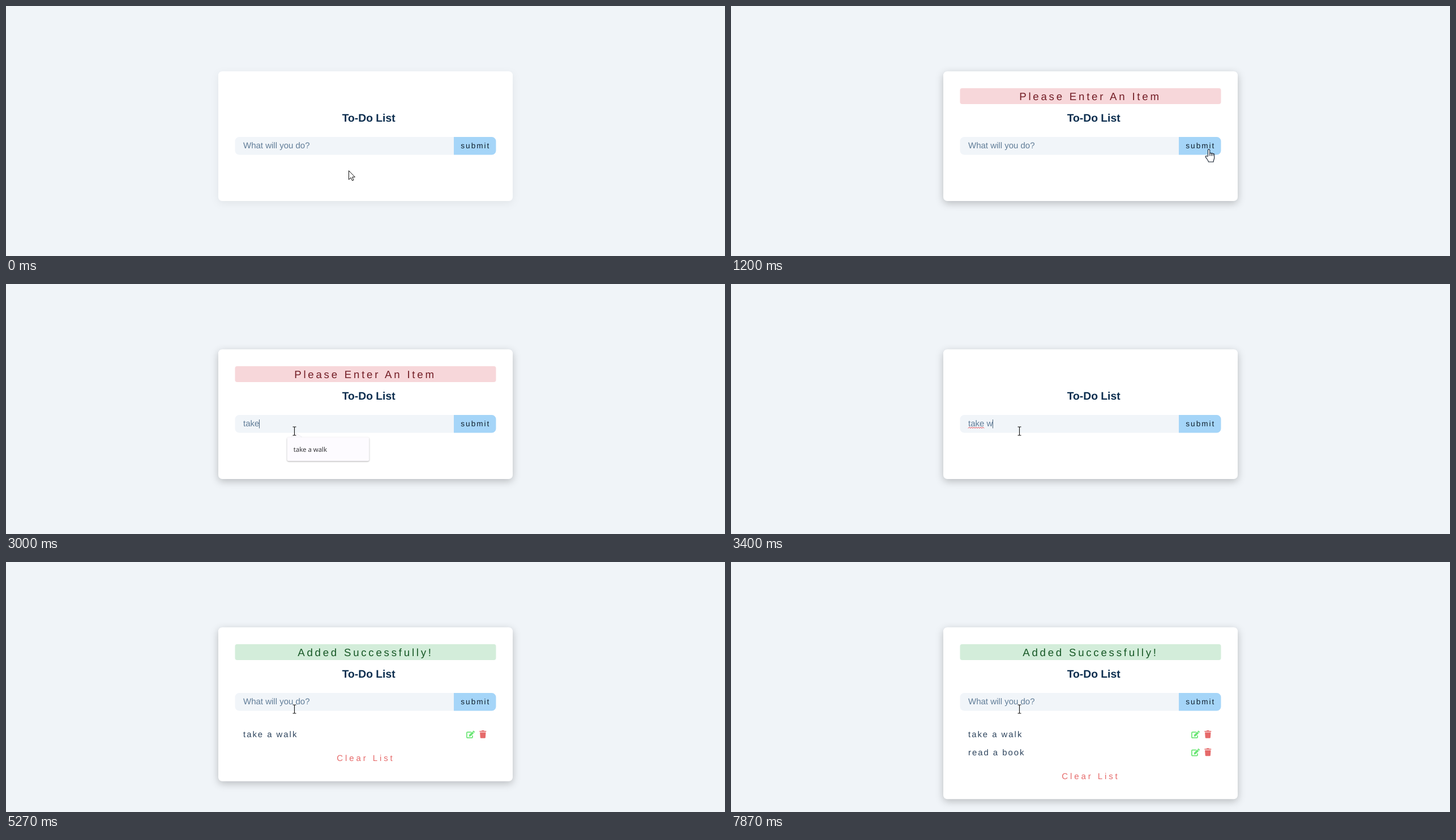
An HTML page for the animation above (8 s loop, 1270x441 px).

```html
<!DOCTYPE html>
<html lang="en">
<head>
<meta charset="utf-8">
<title>To-Do List</title>
<style>
  html, body { margin: 0; width: 100%; height: 100%; overflow: hidden; background: #f0f4f8; }
  svg { display: block; width: 100%; height: 100%; }
  text { font-family: "Liberation Sans", Arial, sans-serif; white-space: pre; text-rendering: geometricPrecision; }
  .title { font-size: 19.3px; font-weight: bold; fill: #0b2d4e; }
  .field { font-size: 15px; fill: #617d98; }
  .submit { font-size: 13.6px; letter-spacing: 2px; fill: #10202e; }
  .alert { font-size: 18.7px; letter-spacing: 3.75px; }
  .item { font-size: 14.86px; letter-spacing: 2px; fill: #2d445d; }
  .clear { font-size: 15px; letter-spacing: 3.9px; fill: #e66a6a; }
  .hint { font-family: "Open Sans", "Noto Sans", sans-serif; font-size: 11.5px; fill: #2b2b2e; }
</style>
</head>
<body>
<svg viewBox="0 0 1270 441">
  <defs>
    <g id="edit" fill="#6be675">
      <path d="M8.6 2.7H2.1A1.2 1.2 0 0 0 .9 3.9v7.6a1.2 1.2 0 0 0 1.2 1.2h7.7a1.2 1.2 0 0 0 1.2-1.2V8.4" fill="none" stroke="#6be675" stroke-width="1.7"/>
      <path d="M10.5 1.8l2.7 2.7-5.6 5.6-2.9.4.3-3.1z"/>
      <path d="M11.1 1.2l.8-.8a1.2 1.2 0 0 1 1.6 0l1.1 1.1a1.2 1.2 0 0 1 0 1.6l-.8.8z"/>
    </g>
    <path id="trash" fill="#e66a6a" d="M.4.9H3.4L3.9.2Q4.1 0 4.5 0H7.5Q7.9 0 8.1.2L8.6.9H11.6Q12 .9 12 1.3V2.2Q12 2.6 11.6 2.6H.4Q0 2.6 0 2.2V1.3Q0 .9 .4.9ZM.8 3.5H11.2L10.6 12.5Q10.5 13.7 9.3 13.7H2.7Q1.5 13.7 1.4 12.5Z"/>
    <g id="row">
      <use href="#edit" x="813" y="297.5"/>
      <use href="#trash" x="836.3" y="297"/>
    </g>
  </defs>

  <rect id="card" x="375" y="115.3" width="520" rx="7" fill="#fff"/>
  <g id="alert">
    <rect id="alertBox" x="404.5" y="145" width="461" height="28" rx="3.7"/>
    <text id="alertText" class="alert" y="166"/>
  </g>
  <text class="title" x="593.7" y="204">To-Do List</text>
  <path d="M791 231H412a7.5 7.5 0 0 0-7.5 7.5V255a7.5 7.5 0 0 0 7.5 7.5H791z" fill="#f1f5f9"/>
  <path d="M791 231h67a7.5 7.5 0 0 1 7.5 7.5V255a7.5 7.5 0 0 1-7.5 7.5H791z" fill="#a5d5f8"/>
  <text class="submit" x="803.3" y="251">submit</text>
  <text id="field" class="field" x="419" y="251"/>
  <path id="squiggle" fill="none" stroke="#e5343d" stroke-width="1"/>
  <rect id="caret" y="239" width="1" height="15.5" fill="#4a647c"/>

  <g id="first"><text class="item" x="419" y="309">take a walk</text><use href="#row"/></g>
  <g id="second"><text class="item" x="419" y="340.5">read a book</text><use href="#row" y="31.5"/></g>
  <text id="clear" class="clear" x="584.3">Clear List</text>

  <g id="popup">
    <path d="M503 270.5l8.5-7.5 12 7.5" fill="#fdfbff" stroke="#e9e8ee" stroke-width=".8"/>
    <rect id="popupBox" x="496.5" y="270.3" width="145" rx="3" fill="#fdfbff" style="filter:drop-shadow(0 1px 1.2px rgba(0,0,0,.32))"/>
    <g id="hints"></g>
  </g>

  <g id="cursor" stroke-linejoin="round">
    <path id="arrow" d="M.5.5V16.2L4.2 12.8 6.6 18 9 17 6.7 11.8H11.4z" fill="#fff" stroke="#111" stroke-width="1"/>
    <g id="hand" fill="#fff" stroke="#111c2b" stroke-width="1.1" stroke-linecap="round">
      <path d="M-1.5 12V1.5a1.6 1.6 0 0 1 3.2 0V7.5a1.4 1.4 0 0 1 2.8.3a1.4 1.4 0 0 1 2.8.6a1.3 1.3 0 0 1 2.4 1V14.5c0 3-1.6 4-1.6 7.5H-.6C-.8 19.5-3.4 17-5.6 13.6c-.9-1.6 1-2.8 2.3-1.6z"/>
      <path d="M1.7 7.5V11M4.5 8V11M7.3 8.5V11" fill="none"/>
    </g>
    <path id="beam" d="M-3-7.5H-1L0-7 1-7.5H3M0-7V7M-3 7.5H-1L0 7 1 7.5H3" fill="none" stroke="#111" stroke-width="1.1"/>
  </g>
</svg>
<script>
const LOOP = 8000, STEP = 1000 / 15;
const $ = id => document.getElementById(id);

// [time, hotspot x, hotspot y]
const path = [
  [0, 606, 291], [130, 565, 266], [270, 517, 238], [330, 516, 222], [470, 565, 194],
  [600, 670, 200], [730, 765, 222], [870, 837, 244], [930, 849, 249], [1200, 846, 252],
  [1330, 795, 272], [1530, 650, 285], [1670, 552, 265], [1800, 517, 247],
  [1930, 512, 239], [2070, 509, 247], [2200, 509, 259]
];

// [time, field content]
const typing = [
  [0, ""], [2330, "t"], [2730, "ta"], [2870, "tak"], [3000, "take"], [3270, "take "],
  [3400, "take w"], [3670, "take "], [3800, "take a"], [3930, "take a "], [4470, "take a w"],
  [4530, "take a wa"], [4670, "take a wal"], [4800, "take a walk"], [4870, ""],
  [5930, "r"], [6070, "re"], [6270, "rea"], [6470, "read"], [6600, "read "], [6670, "read a"],
  [6800, "read a "], [6930, "read a b"], [7070, "read a bo"], [7200, "read a boo"],
  [7330, "read a book"], [7470, ""]
];

const danger = { text: "Please Enter An Item", x: 509.2, ink: "#721c24", fill: "#f7d7da" };
const success = { text: "Added Successfully!", x: 515.2, ink: "#155724", fill: "#d3edda" };
const alerts = [[1130, 3130, danger], [4870, 6870, success], [7470, LOOP, success]];
const hints = ["take a walk", "clean the room", "buy milk", "do homework", "wash the car"];
const HINT_STEP = 29;

hints.forEach((hint, i) => {
  const text = document.createElementNS("http://www.w3.org/2000/svg", "text");
  text.setAttribute("class", "hint");
  text.setAttribute("x", 507.7);
  text.setAttribute("y", 295.7 + i * HINT_STEP);
  text.textContent = hint;
  $("hints").append(text);
});

const set = (id, attrs) => {
  for (const key in attrs) $(id).setAttribute(key, attrs[key]);
};
const show = (id, on) => { $(id).style.display = on ? "" : "none"; };
const within = (t, a, b) => t >= a && t < b;
const latest = (list, t) => list.filter(entry => entry[0] <= t).pop();

function pointer(t) {
  const i = path.findIndex(p => p[0] > t);
  if (i < 0) return path[path.length - 1].slice(1);
  const [a, b] = [path[i - 1], path[i]];
  const k = (t - a[0]) / (b[0] - a[0]);
  return [1, 2].map(n => Math.round(a[n] + (b[n] - a[n]) * k));
}

function drawCursor(t) {
  const [x, y] = pointer(t);
  const inRow = within(y, 231, 263);
  const kind = inRow && within(x, 404, 791) ? "beam" : inRow && within(x, 791, 866) ? "hand" : "arrow";
  for (const id of ["arrow", "hand", "beam"]) show(id, id === kind);
  const half = kind === "beam" ? 0.5 : 0;
  set("cursor", { transform: `translate(${x + half} ${y + half})` });
}

function zigzag(x, end) {
  let d = `M${x} 254.5`;
  for (let up = true; x < end; up = !up) d += `L${x += 2} ${up ? 252.5 : 254.5}`;
  return d;
}

function drawField(t) {
  const value = latest(typing, t)[1];
  const field = $("field");
  field.textContent = value || "What will you do?";
  const width = n => n ? field.getSubStringLength(0, n) : 0;
  set("caret", { x: Math.round(419 + width(value.length)) });
  show("caret", within(t, 2000, 5270) || within(t, 5870, 7870));
  const space = value.indexOf(" ");
  show("squiggle", space > 0);
  if (space > 0) set("squiggle", { d: zigzag(419, 417 + width(space)) });
}

function drawAlert(t) {
  const active = alerts.find(([from, to]) => within(t, from, to));
  show("alert", active);
  if (!active) return;
  const { text, x, ink, fill } = active[2];
  set("alertBox", { fill });
  set("alertText", { x, fill: ink });
  $("alertText").textContent = text;
}

function drawPopup(t) {
  const all = within(t, 2070, 2330);
  show("popup", all || within(t, 2330, 3400) || within(t, 3670, 4930));
  const count = all ? hints.length : 1;
  set("popupBox", { height: 42 + (count - 1) * HINT_STEP });
  [...$("hints").children].forEach((row, i) => { row.style.display = i < count ? "" : "none"; });
}

function drawCard(t) {
  const count = (t >= 4870) + (t >= 7470);
  show("first", count > 0);
  show("second", count > 1);
  show("clear", count > 0);
  const extra = (count - 1) * 31.5;
  set("clear", { y: 351 + extra });
  set("card", { height: count ? 271.5 + extra : 228.7 });
  const shade = 0.06 + 0.17 * Math.min(1, t / 300);
  $("card").style.filter = `drop-shadow(0 4.6px 7px rgba(0,0,0,${shade}))`;
}

function draw(now) {
  const t = Math.floor((now % LOOP + 5) / STEP) * STEP + 4;
  drawCard(t);
  drawAlert(t);
  drawField(t);
  drawPopup(t);
  drawCursor(t);
}

const start = performance.now();
function tick() {
  draw(performance.now() - start);
  requestAnimationFrame(tick);
}
tick();
</script>
</body>
</html>
```
